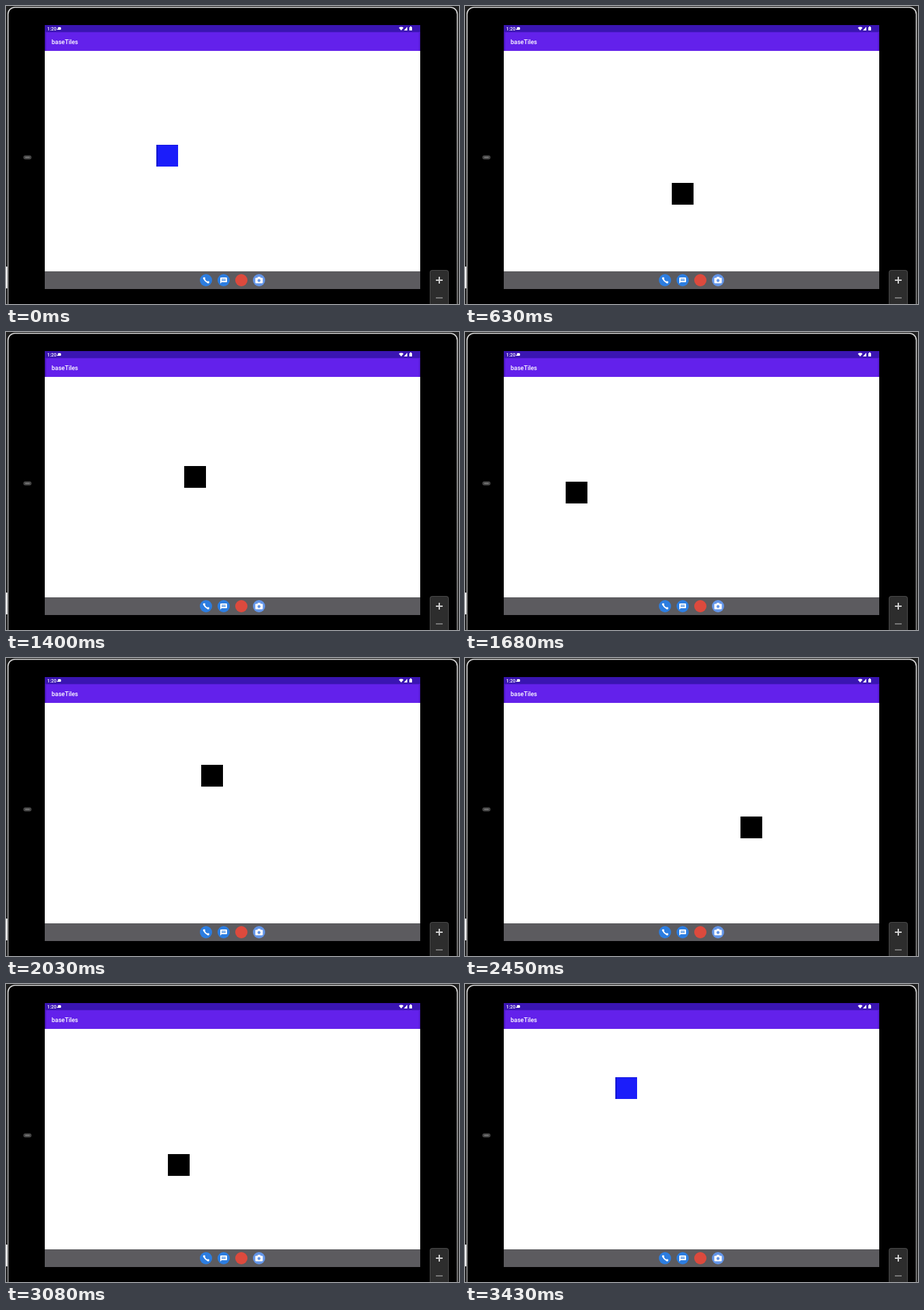
An HTML page with a canvas that plays this animation: 666x438 px, repeating every 4620 ms.

```html
<!DOCTYPE html>
<html lang="en">
<head>
<meta charset="utf-8">
<title>Dragged square</title>
<style>
html, body { margin: 0; width: 100%; height: 100%; overflow: hidden; background: #000; }
canvas { display: block; }
</style>
</head>
<body>
<canvas id="stage" width="666" height="438"></canvas>
<script>
const ctx = document.getElementById('stage').getContext('2d');
const LOOP = 4620, STEP = 70, SIZE = 32;
const PRESS = 280, RELEASE = 3430;

// Drag path: step, left, top
const path = [
  [5, 221, 204], [7, 246, 241], [9, 304, 260], [11, 349, 213], [13, 331, 153],
  [16, 234, 134], [17, 205, 165], [18, 214, 212], [19, 248, 231], [21, 262, 158],
  [22, 215, 151], [24, 148, 220], [26, 196, 243], [28, 272, 204], [29, 287, 157],
  [31, 355, 195], [32, 355, 195], [34, 374, 228], [35, 405, 233], [37, 462, 180],
  [38, 435, 149], [40, 342, 197], [43, 265, 269], [45, 217, 212], [47, 221, 137]
];

function slope(i, axis) {
  const a = path[Math.max(i - 1, 0)], b = path[Math.min(i + 1, path.length - 1)];
  return (b[axis] - a[axis]) / (b[0] - a[0]);
}

function place(step, axis) {
  const last = path.length - 1;
  if (step <= path[0][0]) return path[0][axis];
  if (step >= path[last][0]) return path[last][axis];
  let i = 0;
  while (path[i + 1][0] <= step) i++;
  const a = path[i], b = path[i + 1], span = b[0] - a[0];
  const u = (step - a[0]) / span, v = 1 - u;
  return Math.round(
    v * v * (1 + 2 * u) * a[axis] + u * u * (1 + 2 * v) * b[axis] +
    span * u * v * (v * slope(i, axis) - u * slope(i + 1, axis)));
}

function rect(x, y, w, h, color) {
  ctx.fillStyle = color;
  ctx.fillRect(x, y, w, h);
}

function rounded(x, y, w, h, r, color) {
  ctx.fillStyle = color;
  ctx.beginPath();
  ctx.roundRect(x, y, w, h, r);
  ctx.fill();
}

function disc(x, y, r, color) {
  ctx.fillStyle = color;
  ctx.beginPath();
  ctx.arc(x, y, r, 0, Math.PI * 2);
  ctx.fill();
}

function shape(color, ...pts) {
  ctx.fillStyle = color;
  ctx.beginPath();
  pts.forEach(([x, y]) => ctx.lineTo(x, y));
  ctx.fill();
}

function label(text, x, y, font) {
  ctx.font = font;
  ctx.fillStyle = '#fff';
  ctx.textBaseline = 'alphabetic';
  ctx.fillText(text, x, y);
}

function drawDevice() {
  rect(0, 0, 666, 438, '#202020');
  rounded(3, 2, 660.5, 460, 10, '#000');
  const edge = ctx.createLinearGradient(0, 0, 0, 438);
  edge.addColorStop(0, '#d8d8d8');
  edge.addColorStop(0.4, '#b5b5b5');
  edge.addColorStop(1, '#8c8c8c');
  ctx.strokeStyle = edge;
  ctx.lineWidth = 1.6;
  ctx.beginPath();
  ctx.roundRect(3, 2, 660.5, 460, 10);
  ctx.stroke();
  rect(0, 383, 2, 32, '#f0f0f0');

  rounded(25.5, 219.5, 12, 6, 3, '#444');
  rounded(28, 221.5, 7, 2, 1, '#777');

  rounded(623, 388, 28, 60, 4, '#4a4a4a');
  rounded(624, 389, 26, 60, 3, '#2d2d2d');
  rect(632, 402, 10, 2, '#d0d0d0');
  rect(636, 398, 2, 10, '#d0d0d0');
  rect(632, 428, 10, 2, '#777');
}

function drawBars() {
  rect(57, 28, 552, 388, '#fff');
  rect(57, 28, 552, 10, '#3a15b2');
  rect(57, 38, 552, 28, '#6321eb');
  rect(57, 38, 552, 1, '#521bd0');
  rect(57, 38, 2, 28, '#4b18c0');
  rect(607, 38, 2, 28, '#561bd2');
  rect(57, 390, 552, 26, '#5c5b5f');

  label('1:20', 60.5, 35.7, '500 7px Roboto, sans-serif');
  rounded(76, 31, 5, 4, 1.5, '#fff');
  rect(75, 34, 2, 1, '#fff');
  label('baseTiles', 67, 55.5, '500 9px Roboto, sans-serif');

  shape('#fff', [577.5, 32], [579.5, 30.8], [582.5, 30.8], [584.5, 32], [581, 36]);
  shape('#fff', [585, 36], [590, 36], [590, 30.5]);
  rounded(593, 31, 4, 5, 0.6, '#fff');
  rect(594, 30, 2, 1, '#fff');
}

function drawDock() {
  disc(294, 403, 9, '#2c7de0');
  ctx.strokeStyle = '#fff';
  ctx.lineWidth = 2;
  ctx.beginPath();
  ctx.moveTo(291, 399);
  ctx.quadraticCurveTo(291.5, 405, 298, 406.5);
  ctx.stroke();
  rounded(289.8, 398.7, 3, 3, 0.7, '#fff');
  rounded(295.7, 404.5, 3, 3, 0.7, '#fff');

  disc(320, 403, 9, '#2c7de0');
  rounded(315, 399, 10, 7, 1, '#fff');
  shape('#fff', [315, 405], [318, 405], [315, 408]);
  rect(317, 401, 6, 1, '#2c7de0');
  rect(317, 403, 6, 1, '#2c7de0');

  disc(346, 403, 9, '#dc4a3d');

  disc(372, 403, 9, '#6395e8');
  rounded(366.5, 399.5, 11, 8, 1, '#fff');
  rect(370, 398, 4, 2, '#fff');
  disc(372, 403.5, 2.2, '#6395e8');
}

function drawSquare(time) {
  const step = Math.floor(time / STEP);
  const x = place(step, 1), y = place(step, 2);
  if (time >= PRESS && time < RELEASE) {
    rect(x, y, SIZE, SIZE, '#000');
    return;
  }
  rect(x, y, SIZE, SIZE, '#1b1dfa');
  rect(x, y, SIZE, 1, '#1518dc');
  rect(x, y, 2, SIZE, '#1216ce');
}

function frame(now) {
  drawDevice();
  drawBars();
  drawDock();
  drawSquare(now % LOOP);
  requestAnimationFrame(frame);
}

frame(performance.now());
</script>
</body>
</html>
```
